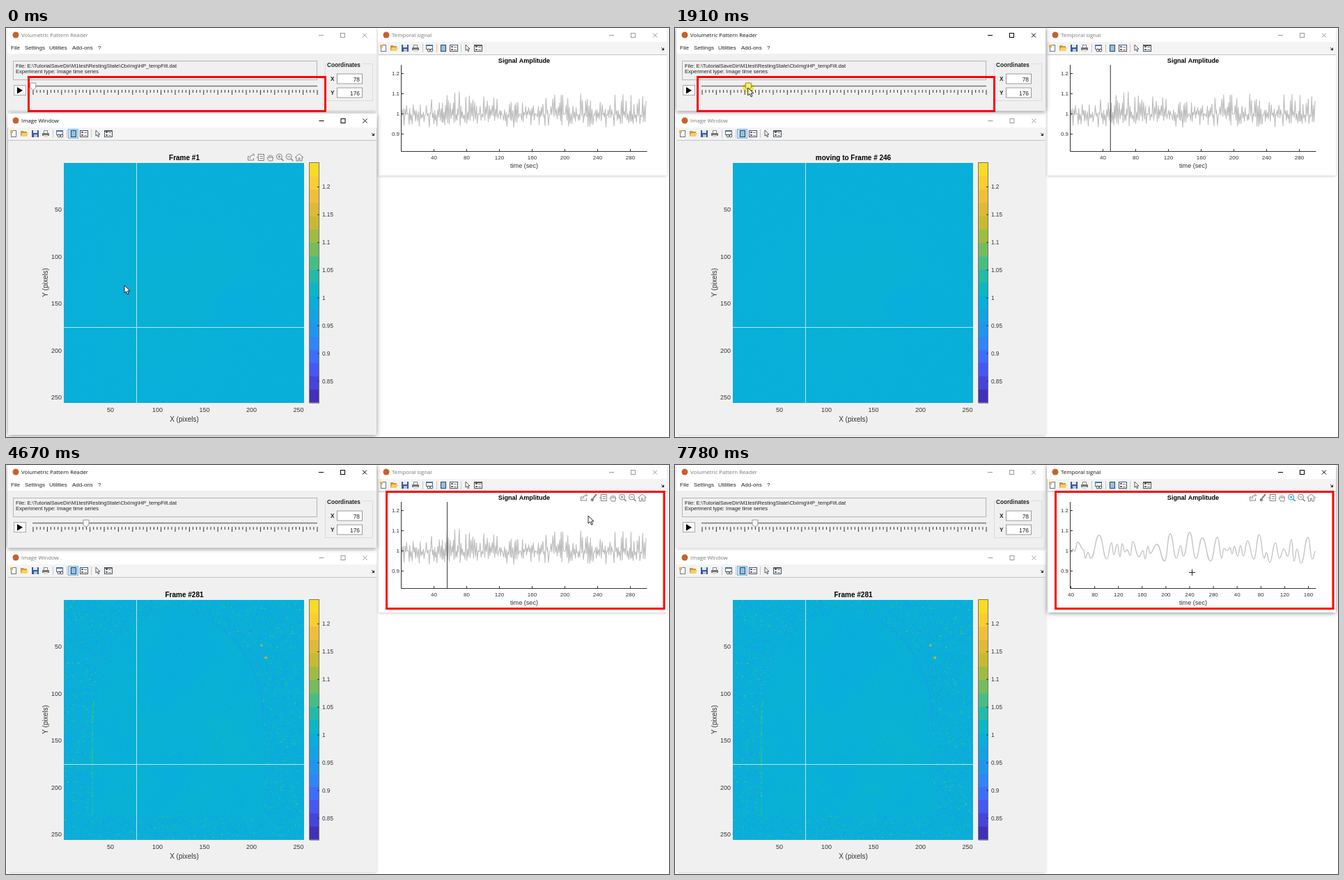
An HTML page with a canvas for the animation above (8 s loop, 952 by 588 pixels).

```html
<!DOCTYPE html>
<html>
<head>
<meta charset="utf-8">
<style>
html, body { margin: 0; width: 100%; height: 100%; overflow: hidden; background: #fff }
canvas { display: block }
</style>
</head>
<body>
<canvas id="stage" width="952" height="588"></canvas>
<script>
const c = document.getElementById('stage').getContext('2d');
const LOOP = 8000;
const SANS = '"Liberation Sans", Arial, sans-serif';
const UI = '"Open Sans", "Noto Sans", sans-serif';

// drawing helpers
function fill(x, y, w, h, color) { c.fillStyle = color; c.fillRect(x, y, w, h); }
function frame(x, y, w, h, color, lw = 1) {
  c.strokeStyle = color; c.lineWidth = lw; c.strokeRect(x, y, w, h);
}
function line(color, lw, ...p) {
  c.strokeStyle = color; c.lineWidth = lw; c.beginPath();
  for (let i = 0; i < p.length; i += 2) c.lineTo(p[i], p[i + 1]);
  c.stroke();
}
function poly(color, ...p) {
  c.fillStyle = color; c.beginPath();
  for (let i = 0; i < p.length; i += 2) c.lineTo(p[i], p[i + 1]);
  c.closePath(); c.fill();
}
function ring(x, y, r, color, lw = 1) {
  c.strokeStyle = color; c.lineWidth = lw;
  c.beginPath(); c.arc(x, y, r, 0, 7); c.stroke();
}
function disc(x, y, r, color) { c.fillStyle = color; c.beginPath(); c.arc(x, y, r, 0, 7); c.fill(); }
// y is the middle of the capitals
function text(s, x, y, size, { align = 'left', bold = false, color = '#222', font = SANS } = {}) {
  c.font = (bold ? 'bold ' : '') + size + 'px ' + font;
  c.textAlign = align; c.fillStyle = color;
  c.fillText(s, x, y + size * 0.36);
}
function random(seed) {
  return () => {
    seed = seed + 0x6D2B79F5 | 0;
    let t = Math.imul(seed ^ seed >>> 15, 1 | seed);
    t = t + Math.imul(t ^ t >>> 7, 61 | t) ^ t;
    return ((t ^ t >>> 14) >>> 0) / 4294967296;
  };
}
const smooth = p => p * p * (3 - 2 * p);

// colour map, from low to high
const MAP = [[62,38,168],[70,68,218],[68,98,252],[45,135,248],[24,158,232],[8,174,220],
  [14,186,186],[70,190,130],[140,187,75],[200,186,48],[236,184,60],[252,206,45],[249,226,30]];
const LOW = 0.812, SPAN = 0.431;
function colorAt(p) {
  p = Math.max(0, Math.min(0.9999, p)) * (MAP.length - 1);
  const i = p | 0;
  return MAP[i].map((a, k) => a + (MAP[i + 1][k] - a) * (p - i));
}
function heat(value) {
  const cv = document.createElement('canvas');
  cv.width = cv.height = 256;
  const g = cv.getContext('2d'), img = g.createImageData(256, 256);
  for (let i = 0; i < 65536; i++) {
    const rgb = colorAt((value(i % 256, i >> 8) - LOW) / SPAN);
    img.data.set([...rgb, 255], i * 4);
  }
  g.putImageData(img, 0, 0);
  return cv;
}
const blob = (x, y, cx, cy, r) => Math.exp(-((x - cx) ** 2 + (y - cy) ** 2) / (r * r));
const rnd = random(7);
const noise = () => rnd() + rnd() + rnd() - 1.5;
const calm = heat((x, y) => 0.995 + noise() * 0.002 +
  0.004 * blob(x, y, 110, 150, 60) + 0.004 * blob(x, y, 160, 115, 30) - 0.006 * blob(x, y, 180, 150, 20));
const busy = heat((x, y) => {
  const half = 92 * Math.sqrt(Math.max(0, 1 - (Math.max(0, 130 - y) / 117) ** 2));
  const d = Math.abs(x - 121) - half;
  if (blob(x, y, 215, 61, 1.6) > 0.5 || blob(x, y, 210, 48, 1.4) > 0.5) return 1.13;
  if (y > 12 && y < 230 && d < 0) {
    if (d > -2 && x < 121 && y > 105) return 1 + rnd() * 0.06;
    if (d > -2 && x > 121 && y < 140) return 0.955 + rnd() * 0.035;
    return 0.997 + noise() * 0.009 + 0.003 * Math.sin(x / 13 + Math.sin(y / 17)) * Math.sin(y / 19)
      - 0.007 * blob(x, y, 120, 60, 45) - 0.007 * blob(x, y, 115, 175, 20) + 0.004 * blob(x, y, 160, 150, 50)
      + (rnd() < 0.012 ? 0.025 : 0);
  }
  const spot = rnd();
  return 0.993 + noise() * 0.018 + (spot < 0.07 ? rnd() * 0.065 : spot > 0.94 ? -rnd() * 0.045 : 0);
});

// long trace: alternating peaks and troughs
const r2 = random(21), trace = [];
for (let x = 568; x < 920; x += 0.8 + r2() * 0.75) {
  const k = trace.length, env = 1 + 0.15 * blob(x, 0, 655, 0, 30) + 0.2 * blob(x, 0, 815, 0, 22) - 0.1 * blob(x, 0, 740, 0, 50);
  trace.push([x, k % 2 ? 123 + r2() ** 1.3 * 20 : 125 - r2() ** 1.6 * 30 * env]);
}
// zoomed trace: turning points
const ZOOM = [568,127,571,121,574,124,578,111,587,122,589,134,593,126,597,134,609,101,620,135,
  627,112,630,129,635,114,639,132,642,113,646,125,649,122,654,130,657,110,666,132,672,123,675,135,
  679,117,682,127,692,114,703,138,711,99,720,134,726,116,730,131,739,97,748,134,757,105,769,138,
  779,104,785,134,788,120,793,123,797,119,800,128,803,117,808,131,812,116,816,131,822,109,831,135,
  839,100,846,134,849,126,854,140,862,112,868,134,874,121,880,131,885,107,889,138,893,121,899,141,
  909,104,915,135,920,124];

function icon(kind, x, y) {
  if (kind === 'new') {
    fill(x - 4, y - 5, 8, 10, '#fff'); frame(x - 3.5, y - 4.5, 7, 9, '#66788c');
    fill(x - 5, y - 5, 4, 4, '#e8b440');
  } else if (kind === 'open') {
    poly('#c99a35', x - 5, y + 4, x - 5, y - 4, x - 1, y - 4, x, y - 3, x + 4, y - 3, x + 4, y + 4);
    poly('#f6cf68', x - 5, y + 4, x - 3, y - 1, x + 6, y - 1, x + 4, y + 4);
  } else if (kind === 'save') {
    fill(x - 5, y - 5, 10, 10, '#3a5a9c'); fill(x - 3, y - 5, 6, 4, '#dce6f5'); fill(x - 2, y + 1, 5, 4, '#b8c4d8');
  } else if (kind === 'print') {
    fill(x - 3, y - 5, 6, 4, '#fff'); frame(x - 2.5, y - 4.5, 5, 4, '#888');
    fill(x - 5, y - 1, 10, 4, '#777'); fill(x - 3, y + 2, 6, 3, '#ddd');
  } else if (kind === 'link') {
    fill(x - 5, y - 5, 10, 7, '#4a6fa5'); fill(x - 4, y - 3, 8, 4, '#fff');
    ring(x - 1, y + 3, 2, '#555'); ring(x + 3, y + 3, 2, '#555');
  } else if (kind === 'bar') {
    fill(x - 3, y - 5, 7, 10, '#8fc0e8'); frame(x - 3.5, y - 4.5, 7, 9, '#345');
  } else if (kind === 'legend' || kind === 'panel') {
    fill(x - 5, y - 5, 11, 10, '#fff'); frame(x - 5.5, y - 4.5, 11, 9, '#456');
    const a = kind === 'legend' ? '#3a62c0' : '#666';
    fill(x - 4, y - 3, 3, 2, a); fill(x - 4, y + 1, 3, 2, kind === 'legend' ? '#c03a3a' : a);
    line('#777', 1, x, y - 1.5, x + 4, y - 1.5); line('#777', 1, x, y + 2.5, x + 4, y + 2.5);
    if (kind === 'panel') fill(x - 5, y - 5, 11, 2, '#555');
  } else if (kind === 'arrow') pointer(x - 3, y - 5, 0.75);
}
function toolbar(x, y, right, pressed) {
  if (pressed) { fill(x + 78, y - 7, 15, 14, '#bfdff5'); frame(x + 78.5, y - 6.5, 14, 13, '#7ab8e4'); }
  ['new', 'open', 'save', 'print', 'link', 'bar', 'legend', 'arrow', 'panel']
    .forEach((k, i) => icon(k, x + [0, 15, 31, 46, 66, 86, 101, 121, 136][i], y));
  for (const s of [56, 76, 111]) line('#c8c8c8', 1, x + s + .5, y - 6, x + s + .5, y + 6);
  line('#333', 1, right - 3, y - 1, right, y + 2); poly('#333', right + 1, y + 3, right - 3, y + 3, right + 1, y - 1);
}
function titleBar(s, x, y, right, active) {
  fill(x, y, right - x, 20, '#fff');
  disc(x + 12, y + 10, 4.5, '#c4622d');
  const col = active ? '#000' : '#999', m = y + 10.5;
  text(s, x + 20, y + 10, 7.8, { font: UI, color: active ? '#111' : '#777' });
  const b = right - 80;
  line(col, 1, b - 3, m, b + 4, m);
  frame(b + 28.5, m - 3, 6, 6, col);
  line(col, 1, b + 60, m - 3, b + 66, m + 3); line(col, 1, b + 66, m - 3, b + 60, m + 3);
}
// window body with border; the active one casts a stronger shadow
function panel(x, y, w, h, color, active) {
  c.save();
  c.shadowColor = active ? 'rgba(0,0,0,.45)' : 'rgba(0,0,0,.2)';
  c.shadowBlur = active ? 7 : 4; c.shadowOffsetY = 1;
  fill(x, y, w, h, color);
  c.restore();
}
function axesTools(x, y, kinds, step, zoomOn) {
  [...kinds].forEach((k, i) => {
    const cx = x + i * step, g = '#858585';
    if (k === 's') { frame(cx - 4.5, y - 1, 8, 5, g); fill(cx - 2, y - 3, 7, 4, '#f6f6f6'); line(g, 1, cx - 2, y + 2, cx, y - 3, cx + 5, y - 3, cx + 2, y - 6); }
    if (k === 'b') { line(g, 2, cx + 4, y - 5, cx - 1, y + 1); disc(cx - 2, y + 3, 2.2, g); }
    if (k === 'd') { frame(cx - 3.5, y - 4.5, 8, 9, g); line(g, 1, cx - 1, y - 1.5, cx + 3, y - 1.5); line(g, 1, cx - 1, y + 1.5, cx + 3, y + 1.5); line(g, 1, cx - 6, y, cx - 3, y); }
    if (k === 'h') {
      for (let f = -3; f < 4; f += 2) line(g, 1, cx + f, y + 1, cx + f, y - 4 + Math.abs(f) / 2);
      line(g, 1, cx - 5, y, cx - 2, y + 5, cx + 3, y + 5, cx + 4, y);
    }
    if (k === '+' || k === '-') {
      const z = k === '+' && zoomOn ? '#2d8fd5' : g;
      ring(cx - 1, y - 1, 4, z); line(z, 1.6, cx + 2, y + 2, cx + 5, y + 5);
      line(z, 1, cx - 3, y - 1, cx + 1, y - 1);
      if (k === '+') line(z, 1, cx - 1, y - 3, cx - 1, y + 1);
    }
    if (k === 'o') line(g, 1, cx - 6, y, cx, y - 5, cx + 6, y, cx + 4, y, cx + 4, y + 5, cx + 1, y + 5, cx + 1, y + 1, cx - 1, y + 1, cx - 1, y + 5, cx - 4, y + 5, cx - 4, y, cx - 6, y);
  });
}
function pointer(x, y, s = 1) {
  c.save(); c.translate(x, y); c.scale(s, s);
  const p = [0, 0, 0, 11, 2.6, 8.7, 4.5, 13, 6.3, 12.2, 4.5, 8, 8, 8];
  poly('#fff', ...p); line('#111', 0.9, ...p, 0, 0);
  c.restore();
}

function viewer(active, thumb) {
  panel(2, 0, 530, 119, '#f0f0f0', active);
  titleBar('Volumetric Pattern Reader', 2, 0, 532, active);
  fill(2, 20, 530, 17, '#fff');
  [['File', 7], ['Settings', 27], ['Utilities', 62], ['Add-ons', 95], ['?', 132]]
    .forEach(([s, x]) => text(s, x, 28, 8));
  frame(10.5, 47.5, 436, 27, '#b4b4b4');
  text('File: E:\\TutorialSaveDir\\M1test\\RestingState\\CtxImg\\HP_tempFilt.dat', 14, 54.5, 7.6);
  text('Experiment type: Image time series', 14, 62.5, 7.6);
  frame(458.5, 51.5, 68, 53, '#dcdcdc');
  fill(460, 46, 51, 12, '#f0f0f0');
  text('Coordinates', 461, 53, 8.2, { bold: true });
  [['X', '78', 73.5], ['Y', '176', 93.5]].forEach(([k, v, y]) => {
    text(k, 466, y, 8.2, { bold: true });
    fill(475, y - 8, 37, 15, '#fff'); frame(475.5, y - 7.5, 36, 14, '#999');
    text(v, 508, y, 8.4, { align: 'right' });
  });
  fill(11, 82, 17, 15, '#fafafa'); frame(11.5, 82.5, 17, 14, '#aaa');
  poly('#000', 16, 85, 24, 89.7, 16, 94.5);
  line('#777', 1.3, 38, 83.5, 447, 83.5);
  for (let i = 0; i <= 80; i++) {
    const x = 39 + i * 5.1;
    line('#333', 1, x, 89, x, i % 4 ? 93 : 96);
  }
  const p = [-4, -5, 4, -5, 4, 2, 0, 5, -4, 2].map((v, i) => v + (i % 2 ? 84 : thumb));
  poly('#fafafa', ...p); line('#999', 1, ...p, p[0], p[1]);
}

function imageWindow(active, title, pic, tools) {
  panel(3, 123, 529, 462, '#f0f0f0', active);
  titleBar('Image Window', 2, 123, 532.5, active);
  fill(3, 143, 529, 18, '#f4f4f4');
  line('#c4c4c4', 1, 3, 161.5, 532, 161.5);
  toolbar(11, 152, 528, true);
  c.imageSmoothingEnabled = false;
  c.drawImage(pic, 83, 194, 345, 345);
  line('#b4e4f0', 1, 187.5, 194, 187.5, 539);
  line('#b4e4f0', 1, 83, 430.5, 428, 430.5);
  text(title, 256, 186, 10, { bold: true, align: 'center', color: '#000' });
  for (let i = 1; i < 6; i++) {
    text(i * 50, 80, 193.5 + i * 67.5, 9, { align: 'right', color: '#333' });
    text(i * 50, 82.5 + i * 67.5, 548.5, 9, { align: 'center', color: '#333' });
  }
  text('X (pixels)', 256, 562, 10, { align: 'center', color: '#333' });
  c.save(); c.translate(56, 366); c.rotate(-Math.PI / 2);
  text('Y (pixels)', 0, 0, 10, { align: 'center', color: '#333' });
  c.restore();
  const bands = 18, h = 345 / bands;
  for (let i = 0; i < bands; i++)
    fill(436, 194 + i * h, 14, h + 0.5, 'rgb(' + colorAt(1 - (i + 0.5) / bands).map(Math.round) + ')');
  frame(435.5, 193.5, 14, 345, '#777');
  for (let i = 0; i < 8; i++) {
    const y = 228.5 + i * 39.9;
    line('#333', 1, 447, y, 450, y);
    text(+(1.2 - i * 0.05).toFixed(2), 454, y, 8.2, { color: '#333' });
  }
  if (tools) axesTools(352, 186, 'sdh+-o', 13.8);
}

function signalWindow(active, frameNo, zoomed, tools, zoomOn) {
  panel(535, 0, 414, 212, '#fff', active);
  titleBar('Temporal signal', 534, 0, 949, active);
  fill(535, 20, 414, 18, '#f4f4f4');
  line('#c4c4c4', 1, 535, 38.5, 949, 38.5);
  toolbar(542, 29, 944, false);
  text('Signal Amplitude', 744, 46.5, 9.1, { bold: true, align: 'center', color: '#000' });
  c.lineJoin = 'round';
  if (zoomed) {
    c.strokeStyle = '#c4c4c4'; c.lineWidth = 1.4; c.beginPath(); c.moveTo(ZOOM[0], ZOOM[1]);
    for (let i = 2; i < ZOOM.length; i += 2) {
      const x = ZOOM[i], y = ZOOM[i + 1], m = (ZOOM[i - 2] + x) / 2;
      c.bezierCurveTo(m, ZOOM[i - 1], m, y, x, y);
    }
    c.stroke();
  } else {
    line('#bcbcbc', 1.1, ...trace.flat());
    if (frameNo > 1) {
      const x = 567.5 + frameNo * 0.235;
      line('#555', 1.2, x, 53, x, 177);
    }
  }
  c.lineJoin = 'miter';
  line('#333', 1, 567.5, 53, 567.5, 177.5, 920.5, 177.5);
  [1.2, 1.1, 1, 0.9].forEach((v, i) => {
    const y = 65.5 + i * 29;
    line('#333', 1, 568, y, 571, y);
    text(v, 565, y, 8, { align: 'right', color: '#333' });
  });
  for (let i = 0; i < (zoomed ? 11 : 7); i++) {
    const x = zoomed ? 568.5 + i * 34.1 : 614.5 + i * 47;
    line('#333', 1, x, 174, x, 177);
    text(40 * (i % 7 + 1), x, 186, 8, { align: 'center', color: '#333' });
  }
  text('time (sec)', 744, 198, 9.1, { align: 'center', color: '#333' });
  if (tools) axesTools(830, 47, 'sbdh+-o', 13.9, zoomOn);
}

// pointer path: time, x, y
const PATH = [[0,170,370],[70,170,370],[600,35,66],[810,37,83],[940,37,83],[1080,40,82],[1360,40,82],
  [1980,107,86],[2440,114,87],[3900,114,87],[3930,118,85],[4670,836,73],[4800,868,58],[5410,886,48],
  [5950,886,48],[6480,715,131],[6550,715,131],[6760,697,145],[7090,697,145],[7380,742,154],[LOOP,742,154]];
function pointerAt(t) {
  const i = PATH.findIndex(k => k[0] > t), [t0, x0, y0] = PATH[i - 1], [t1, x1, y1] = PATH[i];
  const p = smooth((t - t0) / (t1 - t0));
  return [x0 + (x1 - x0) * p, y0 + (y1 - y0) * p];
}

function draw(t) {
  const [x, y] = pointerAt(t);
  const drag = t < 1360 ? 0 : t > 2440 ? 1 : (x - 40) / 74;
  const n = Math.round(1 + 280 * drag);
  const loaded = t >= 2840, zoomed = t >= 7640, zoomOn = t >= 5950;
  const focus = t < 1230 ? 'image' : t < 5750 ? 'viewer' : 'signal';

  fill(0, 0, 952, 588, '#fff');
  const windows = {
    viewer: on => viewer(on, 38.7 + 76.3 * drag),
    image: on => imageWindow(on, n > 1 && !loaded ? 'moving to Frame # ' + n : 'Frame #' + n,
      loaded ? busy : calm, t < 810 && y > 194),
    signal: on => signalWindow(on, n, zoomed, t > 3930 && x > 568, zoomOn)
  };
  for (const name in windows) if (name !== focus) windows[name](false);
  windows[focus](true);
  if (t < 4200) frame(32.5, 70.5, 426, 49, '#f00', 3);
  else frame(546.5, 38.5, 398.5, 168, '#f00', 3);

  const pressed = (t >= 1230 && t < 2740) || (t >= 5680 && t < 5950) || (t >= 7090 && t < 7580);
  if (pressed) {
    c.globalCompositeOperation = 'multiply';
    disc(x + 0.5, y, 8, '#fff36a');
    c.globalCompositeOperation = 'source-over';
  }
  if (zoomOn && y > 53) {
    const cx = Math.round(x) + .5, cy = Math.round(y) + .5;
    line('#222', 1, cx - 4.5, cy, cx + 4.5, cy);
    line('#222', 1, cx, cy - 4.5, cx, cy + 4.5);
  } else pointer(x, y);
}

function tick(now) {
  draw(now % LOOP);
  requestAnimationFrame(tick);
}
draw(0);
requestAnimationFrame(tick);
</script>
</body>
</html>
```
